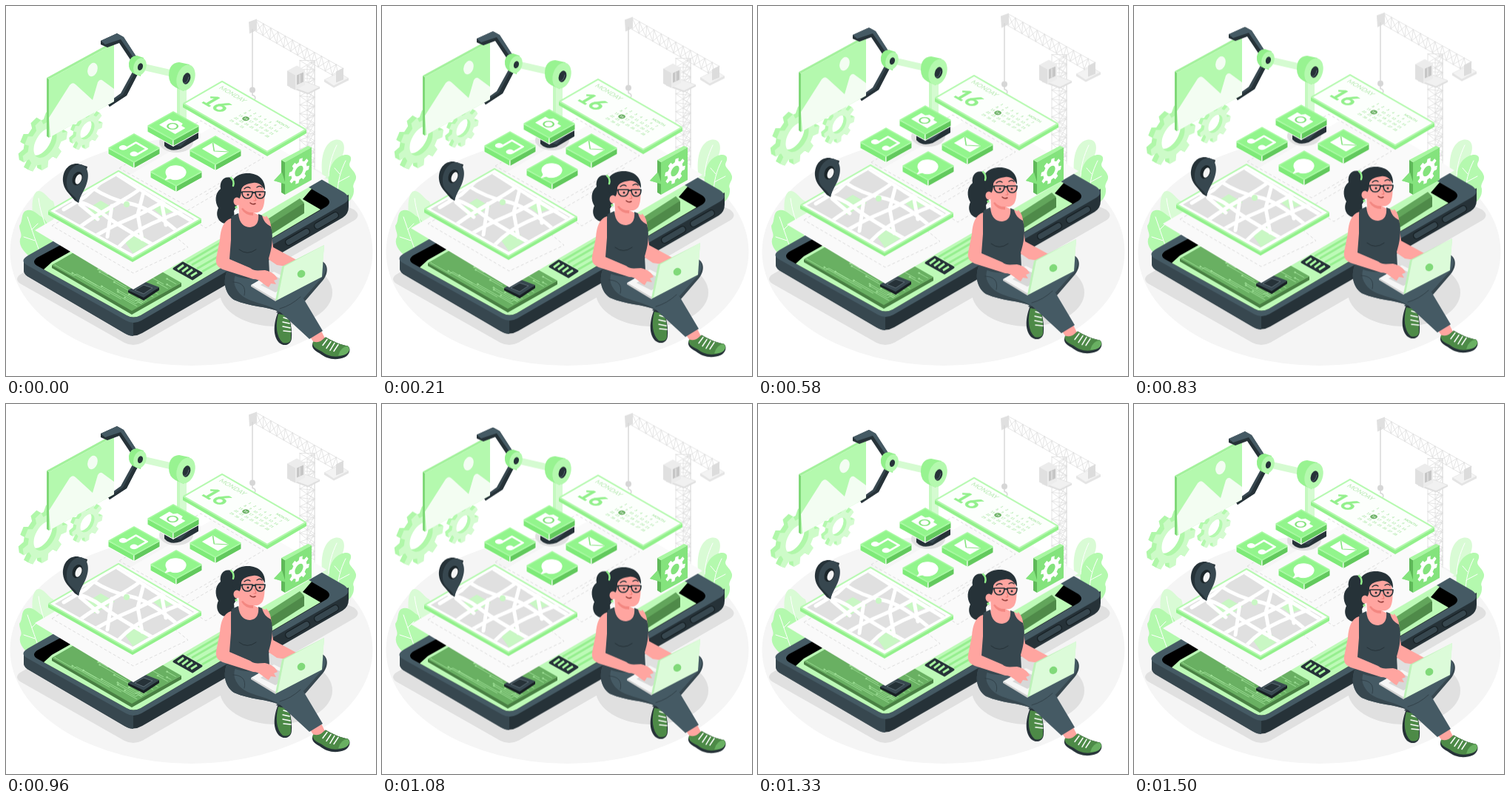
An HTML page for the animation above (1.54 s loop, 500 by 500 pixels).

```html
<!DOCTYPE html>
<html lang="en">
<head>
<meta charset="utf-8">
<title>App development</title>
<style>
html, body { margin: 0; width: 100%; height: 100%; overflow: hidden; background: #fff; }
svg { display: block; width: 100%; height: 100%; }
.float { animation: float 1540ms linear infinite; }
@keyframes float {
  0%, 97%, 100% { transform: translateY(0); }
  48% { transform: translateY(-10px); }
}
.line { fill: none; stroke-linecap: round; stroke-linejoin: round; }
text { font-family: Lato, sans-serif; }
</style>
</head>
<body>
<svg viewBox="0 0 500 500">
<defs>
  <g id="tile" stroke-linejoin="round">
    <path d="M-35 0V8L0 27.500V19Z" fill="#7eea78"/>
    <path d="M35 0V8L0 27.500V19Z" fill="#62c95d"/>
    <path d="M-34 0L0-19L34 0L0 19Z" fill="#92f58c" stroke="#a6faa0" stroke-width="1.500"/>
  </g>
  <clipPath id="mapClip"><path d="M66 277L152 228L254 288L171 335Z"/></clipPath>
  <clipPath id="boardClip"><path d="M65 350L170 410L233 374L128 314Z"/></clipPath>
</defs>

<ellipse cx="250.500" cy="332" rx="245" ry="154" fill="#f5f5f5"/>
<g fill="#e0e0e0">
  <path d="M19 363Q11 369 19 375L160 455Q172 461 184 455L470 290Q481 283 470 275L300 200Z"/>
  <ellipse cx="365" cy="387" rx="76" ry="46"/>
</g>

<g id="bushes">
  <path d="M39 300C34 275 34 258 41 251C50 246 57 262 64 264C70 280 62 300 50 312Z" fill="#d9fbd5"/>
  <path d="M38 344C25 333 17 325 19 315C23 309 18 304 18 297C23 291 20 281 26 277C36 272 42 282 50 286C63 300 66 320 64 335Z" fill="#b4f9ae"/>
  <path d="M428 232C424 208 429 185 444 181C457 178 460 191 454 204C450 215 448 226 446 236Z" fill="#d9fbd5"/>
  <path d="M438 250C432 230 438 209 452 203C463 198 469 203 465 211C461 218 471 221 473 230C474 237 467 240 470 247C471 257 465 264 458 268Z" fill="#b4f9ae"/>
  <path d="M29 285C36 305 40 318 47 336M24 312L39 317M35 302L43 294M44 260C46 275 49 285 55 300M447 188C440 203 437 214 436 230M459 209C452 223 448 237 448 255M451 227L444 219M449 238L464 230" class="line" stroke="#fff" stroke-width="1"/>
</g>

<g class="float">
  <g id="gears"></g>

  <g id="crane" transform="translate(0 1.500)">
    <g id="truss" class="line" stroke="#dedede" stroke-width=".8"></g>
    <path d="M328 20L339 16V31L329 36Z" fill="#e0e0e0"/>
    <path d="M333 30V110" class="line" stroke="#d6d6d6" stroke-width="1.400"/>
    <circle cx="333" cy="112" r="4" fill="#d6d6d6"/>
    <path d="M333 115V119C339 120 337 127 333 126" class="line" stroke="#d6d6d6" stroke-width="1.500"/>
    <path d="M430 98L450 88L463 96V99L443 109L430 101Z" fill="#e4e4e4"/>
    <path d="M431 98L450 89L462 96L443 106Z" fill="#f3f3f3"/>
    <path d="M446 87L456 82V98L446 102Z" fill="#dcdcdc"/>
    <path d="M384 107L400 99L424 108L408 116Z" fill="#f1f1f1" stroke="#dedede" stroke-width=".7"/>
    <path d="M384 107V109L408 118L424 110V108L408 116Z" fill="#dedede"/>
    <path d="M380 86L393 79L404 85V105L391 112L380 106Z" fill="#ececec"/>
    <path d="M380 86L391 92V112L380 106Z" fill="#e0e0e0"/>
    <path d="M393 92L402 88V101L393 105Z" fill="#c6c6c6"/>
    <path d="M397 91V103" stroke="#eee"/>
  </g>

  <g id="phone">
    <path d="M24 343V357Q24 363 32 367L160 442Q172 449 184 442L455 286Q463 281 463 271V255L172 400Z" fill="#263238"/>
    <path d="M24 343V357Q24 363 32 367L160 442Q166 446 172 446V420Z" fill="#37474f"/>
    <path d="M30 337Q18 344 28 350L162 425Q172 431 183 425L457 267Q468 260 457 252L330 179Q318 173 308 179Z" fill="#455a64"/>
    <path d="M42 340Q34 346 42 351L163 418Q172 423 182 418L433 271Q441 265 433 259L318 192Z" fill="#000"/>
    <path d="M51 356L163 418Q172 423 182 418L425 275L401 261L413 247L395 237L318 192L85 333L62 346Z" fill="#bdfab7"/>
    <g class="line">
      <path d="M382 319L406 305M421 297L445 283" stroke="#161f23" stroke-width="10"/>
      <path d="M382 319L406 305M421 297L445 283" stroke="#37474f" stroke-width="7.500"/>
    </g>
    <path d="M62 350V354L170 417L237 379V374L170 411Z" fill="#498043"/>
    <path d="M62 350L170 412L237 374L128 312Z" fill="#69b062"/>
    <g id="board" class="line" stroke="#a6e79f" stroke-width=".8" clip-path="url(#boardClip)"></g>
    <path d="M165 384V387L186 398L207 384V380L186 392Z" fill="#171f23"/>
    <path d="M165 384L186 372L207 380L186 394Z" fill="#37474f"/>
    <path d="M174 384L186 377L198 381L186 389Z" fill="#263238" stroke="#67777f" stroke-width=".8"/>
    <path d="M251 350L294 325M258 355L300 331M265 359L300 339M244 347L290 320" stroke="#96ef8f" stroke-width="3"/>
    <path d="M227 355L239 347L264 361L252 369Z" fill="#263238" stroke="#263238" stroke-width="3" stroke-linejoin="round"/>
    <path d="M232 356L240 350M238 359L246 353M244 362L252 356M250 365L258 360" stroke="#a8f8a1" stroke-width="3"/>
    <path d="M335 300L397 263L403 267V280L350 314Z" fill="#4f8a49"/>
    <path d="M335 300L397 260L403 266L350 300Z" fill="#62a55b"/>
  </g>

  <g id="sheet">
    <path d="M39 303L300 151L433 231L172 383Z" fill="#fafafa"/>
    <path d="M62 297L150 246L246 326L172 361ZM153 219L263 155L348 205L240 268ZM239 280L308 240L340 258L270 300ZM270 255L330 220" fill="none" stroke="#dedede" stroke-width="1" stroke-dasharray="4 3"/>
  </g>

  <g id="base">
    <ellipse cx="230" cy="184" rx="23" ry="14" fill="#e0e0e0"/>
    <path d="M214 183V189Q222 198 236 193L260 179V170Z" fill="#263238"/>
    <path d="M214 184L258 168L236 190Z" fill="#37474f"/>
  </g>

  <g id="arm">
    <path d="M231 106H244V158H231Z" fill="#d5fbd1"/>
    <path d="M231 106H235V158H231Z" fill="#c5f9c0"/>
    <path d="M184 82L232 93" stroke="#d5fbd1" stroke-width="9"/>
    <path d="M171 89L178 92L163 121L140 136L137 131L155 118Z" fill="#37474f"/>
    <path d="M178 92L163 121L140 136L138 133L158 120L174 90Z" fill="#263238"/>
    <path d="M55 97L58 99V178L55 176Z" fill="#7fd878"/>
    <path d="M55 97L143 49L146 51L58 99Z" fill="#a2f19b"/>
    <path d="M58 99L146 51V129L58 178Z" fill="#b4f9ae"/>
    <path d="M58 151L86 107Q90 102 94 106L117 127L124 103Q127 98 131 101L146 112V129L60 177Z" fill="#f3fdf2"/>
    <ellipse cx="117" cy="86" rx="6.500" ry="9.500" fill="#f3fdf2" transform="rotate(18 117 86)"/>
    <path d="M128 47L150 37L159 42L179 73L171 77L153 50L137 56L128 52Z" fill="#263238"/>
    <path d="M128 47L150 37L159 42L179 73L175 74L155 45L134 52Z" fill="#455a64"/>
    <path d="M166 77Q168 67 177 67L186 70L182 95L174 92Q165 88 166 77Z" fill="#92f08b"/>
    <ellipse cx="181" cy="82" rx="8.500" ry="12" fill="#b4f9ae" transform="rotate(18 181 82)"/>
    <ellipse cx="181.500" cy="82" rx="3.400" ry="5" fill="#263238" transform="rotate(18 181 82)"/>
    <path d="M220 94Q220 77 234 76L248 79L240 115L229 110Q220 105 220 94Z" fill="#98f391"/>
    <ellipse cx="243" cy="97" rx="12" ry="18" fill="#b4f9ae" transform="rotate(18 243 97)"/>
    <ellipse cx="244" cy="98" rx="5" ry="8" fill="#263238" transform="rotate(18 244 98)"/>
    <path d="M241 104Q245 105 247 96" class="line" stroke="#56666e" stroke-width="1"/>
  </g>

  <g id="map">
    <path d="M57 277V282L171 346L264 293V288L171 340Z" fill="#92f08b"/>
    <path d="M58 277L152 223L263 288L171 341Z" fill="#fff" stroke="#b4f9ae" stroke-width="2" stroke-linejoin="round"/>
    <g clip-path="url(#mapClip)">
      <path d="M50 277L152 215L270 288L171 345Z" fill="#e0e0e0"/>
      <path d="M107 276L128 263L147 274L120 290ZM196 272L216 262L236 274L210 283ZM160 318L181 307L195 320L172 335Z" fill="#c9f7c4"/>
      <g class="line" stroke="#fff" stroke-width="5">
        <path d="M88 262Q112 266 131 281T205 326M117 246Q142 262 168 267T232 305M150 228L197 258L250 290M98 300Q116 286 150 267T188 240M122 310Q146 296 168 287T222 259M152 326Q172 305 197 294T246 274M78 275L108 257L133 234M100 268L124 288M143 270L137 312M186 251L178 282L184 315M210 264L216 296"/>
      </g>
      <circle cx="163" cy="268" r="4" fill="#c9f7c4"/>
    </g>
  </g>

  <g id="pin">
    <path d="M77 237C76 221 86 212 97 213L110 217L98 266L93 263C85 253 78 248 77 237Z" fill="#263238"/>
    <path d="M82 241C81 225 91 214 101 214C111 216 113 229 109 240C106 250 101 254 98 266C94 255 83 254 82 241Z" fill="#37474f"/>
    <ellipse cx="96.500" cy="233" rx="6.500" ry="9.500" fill="#1b2529" transform="rotate(22 96 233)"/>
    <ellipse cx="98" cy="234" rx="4" ry="7" fill="#f5f5f5" transform="rotate(22 98 234)"/>
  </g>

  <g id="apps" fill="none" stroke="#fff" stroke-linejoin="round">
    <use href="#tile" x="226" y="162"/>
    <g transform="matrix(.866 .5 -.866 .5 226 162)">
      <path d="M-12-6H-6L-4-10H4L6-6H12V9H-12Z" fill="#fff"/>
      <circle cy="1" r="5.500" stroke="#84e37d" stroke-width="2"/>
    </g>
    <use href="#tile" x="173" y="192"/>
    <g transform="matrix(.866 .5 -.866 .5 173 192)">
      <path d="M-6 8V-9H11V7" stroke-width="3"/>
      <g fill="#fff" stroke="none"><circle cx="-9" cy="8" r="4.500"/><circle cx="8" cy="8" r="4.500"/></g>
    </g>
    <use href="#tile" x="283" y="195"/>
    <g transform="matrix(.866 .5 -.866 .5 283 195)">
      <path d="M-12-8H12V8H-12Z" fill="#fff"/>
      <path d="M-12-8L0 2L12-8" stroke="#84e37d" stroke-width="1.300"/>
    </g>
    <use href="#tile" x="230" y="224"/>
    <path d="M216 226C215 218 224 215 232 216C242 217 246 224 241 230C236 235 226 236 222 233L215 235L218 231Z" fill="#fff"/>
  </g>

  <g id="calendar">
    <path d="M239 132V137L353 203L406 172V167L353 196Z" fill="#92f08b"/>
    <path d="M240 132L292 102L405 167L353 197Z" fill="#fcfffc" stroke="#b4f9ae" stroke-width="2" stroke-linejoin="round"/>
    <text transform="matrix(.866 .5 -.866 .5 287 111)" font-size="8.800" fill="#b5e9b0">MONDAY</text>
    <text transform="matrix(.866 .5 -.866 .5 262 129)" font-size="28" font-weight="700" fill="#92f08b" stroke="#92f08b" stroke-width=".6">16</text>
    <text transform="matrix(.866 .5 -.866 .5 364 156)" font-size="5" font-weight="700" fill="#a5e59f">MONTH</text>
    <g id="days" transform="matrix(.866 .5 -.866 .5 328 142)" font-size="4.500" font-weight="700" text-anchor="middle"></g>
  </g>

  <g id="woman" transform="translate(0 1)">
    <path d="M372 346L422 342C436 345 437 359 428 370L385 420L365 413L395 382Z" fill="#37474f"/>
    <path d="M400 345L424 344C434 347 434 357 427 366L402 394L390 385Z" fill="#455a64"/>
    <path d="M367 414C362 428 360 444 369 454C376 460 386 457 386 447C387 436 384 427 383 418L372 411Z" fill="#263238"/>
    <path d="M368 415C364 430 365 446 374 454C383 456 386 452 385 444C386 435 384 427 382 418Z" fill="#4d8a47"/>
    <path d="M375 420L382 422M374 426L383 428M374 432L384 434M375 438L385 439" class="line" stroke="#fff" stroke-width="1.500"/>
    <path d="M410 445L424 434L431 448L419 458Z" fill="#ffa5a0"/>
    <g transform="translate(0 1.500)">
      <path d="M415 452C424 455 428 448 432 445C444 452 452 455 462 457C467 461 464 469 458 472C446 477 434 475 424 467C415 462 412 458 415 452Z" fill="#263238"/>
      <path d="M415 451C424 454 428 448 432 445C444 452 452 455 462 457C466 461 464 465 459 468C446 474 435 471 426 464C417 460 413 456 415 451Z" fill="#4d8a47"/>
      <path d="M462 457Q452 458 449 470Q463 470 464 461Z" fill="#69b062"/>
      <path d="M428 456L434 448M433 460L439 451M438 463L444 453M443 464L449 455" class="line" stroke="#fff" stroke-width="1.500"/>
    </g>
    <path d="M299 356C293 370 295 387 308 396C330 406 352 404 371 413L410 449L428 438L400 391C390 380 366 374 354 356Z" fill="#455a64"/>
    <path d="M299 356C293 370 295 387 308 396C330 406 352 404 371 413C352 399 324 401 313 384C306 374 308 366 312 358Z" fill="#37474f"/>
    <path d="M307 372Q326 373 322 390M370 408Q385 404 398 392" class="line" stroke="#2e3c43" stroke-width=".8"/>

    <path d="M306 232C295 227 288 236 290 246C282 252 282 264 287 272C282 282 288 294 299 293C309 291 309 282 308 276C314 268 314 258 312 250Z" fill="#263238"/>
    <path d="M300 291C306 283 315 285 315 278L314 262H334V277C340 284 352 279 357 292V306H300Z" fill="#ffa5a0"/>
    <path d="M351 282C358 287 359 298 359 310L361 325L396 344L392 353L366 349L347 336Z" fill="#ffa5a0"/>
    <path d="M305 283L314 279C315 293 322 298 330 298C339 297 342 290 341 280L346 282C348 290 352 294 358 297C362 312 359 327 355 340L356 360C340 371 313 369 299 358L302 330V300Z" fill="#37474f"/>
    <path d="M315 328Q326 337 338 328" class="line" stroke="#263238" stroke-width="1"/>

    <path d="M313 244C316 234 344 233 348 245C351 257 349 270 346 274C341 280 332 279 328 276L320 272C314 270 312 255 313 244Z" fill="#ffa5a0"/>
    <path d="M320 272Q326 279 334 278V282Q323 282 318 273Z" fill="#f38781"/>
    <path d="M305 246C302 232 314 225 327 225C341 225 351 234 350 248C346 241 341 237 334 238C326 239 320 241 318 247C318 253 317 259 314 260C309 259 306 253 305 246Z" fill="#263238"/>
    <ellipse cx="312" cy="263" rx="4.500" ry="5.500" fill="#ffa5a0"/>
    <path d="M304 231Q309 235 307 242" class="line" stroke="#92f08b" stroke-width="2.500"/>
    <g class="line" stroke="#263238" stroke-width="1.700">
      <path d="M319 250H333Q333 259 326 259T319 250ZM337 250H350Q350 259 343.500 259T337 250ZM333 252Q335 250 337 252M319 251L312 250"/>
      <path d="M322 246Q326 242 330 245M339 244Q343 241 346 244" stroke-width="1.300"/>
      <path d="M336 256L338 262H335" stroke="#ed7770" stroke-width="1"/>
      <path d="M330 265Q333 268 337 266" stroke="#8d3935" stroke-width="1.500"/>
    </g>
    <g fill="#263238"><circle cx="327" cy="254" r="1.500"/><circle cx="343" cy="254" r="1.500"/></g>
    <circle cx="311" cy="271" r="1.800" fill="#92f08b"/>

    <path d="M331 376V378L364 398L396 377V375L364 394Z" fill="#d2d2d2"/>
    <path d="M331 376L362 358L396 375L364 395Z" fill="#f6f6f6"/>
    <path d="M344 376L364 364L384 374L364 386Z" fill="#d7d7d7"/>
    <path d="M304 286C294 289 290 300 289 315L284 340C283 348 286 352 293 355L334 368C344 368 348 376 355 379L358 374L365 375L362 370L367 368C364 361 358 358 350 356C342 356 336 358 330 353L302 341L304 315Z" fill="#ffa5a0"/>
    <path d="M364 397L373 351L430 322L426 365L367 396Z" fill="#bdf2b8"/>
    <path d="M367 396L376 351L430 322L427 365Z" fill="#dcfbd9"/>
    <ellipse cx="399" cy="361" rx="5.500" ry="5" fill="#80d979" transform="rotate(-35 399 361)"/>
  </g>
</g>

<g id="bubble">
  <path d="M362 236L372 225V252L377 240Z" fill="#7fdf78"/>
  <path d="M372 208L377 211V255L372 252Z" fill="#5fb959"/>
  <path d="M362 236L373 225L378 241Z" fill="#84e37d"/>
  <path d="M372 208L408 189L413 191L377 211Z" fill="#a8f7a1"/>
  <path d="M377 211L413 191V235L377 255Z" fill="#84e37d"/>
</g>
</svg>
<script>
const add = (id, markup) => document.getElementById(id).insertAdjacentHTML('beforeend', markup);

// Gear outline with a round hole, centred on the origin
function gearPath(teeth, outer, root, hole) {
  const step = 2 * Math.PI / teeth;
  let d = '';
  for (let i = 0; i < teeth; i++) {
    [[-.3, root], [-.2, outer], [.2, outer], [.3, root]].forEach(([k, r]) => {
      const a = (i + k) * step + .2;
      d += (d ? 'L' : 'M') + (r * Math.cos(a)).toFixed(1) + ' ' + (r * Math.sin(a)).toFixed(1);
    });
  }
  return `${d}ZM${hole} 0A${hole} ${hole} 0 1 0 ${-hole} 0A${hole} ${hole} 0 1 0 ${hole} 0Z`;
}

// Extruded gear on an upright isometric plane
function gear(id, x, y, d, depth, face, side) {
  let out = '';
  for (let i = depth; i >= 0; i--) {
    out += `<path transform="matrix(.866 -.5 0 1 ${x - i} ${y - i * .55})" d="${d}" fill-rule="evenodd" fill="${i ? side : face}"/>`;
  }
  add(id, out);
}
gear('gears', 110, 168, gearPath(9, 24, 18, 11), 4, '#d5fbd1', '#b4f9ae');
gear('gears', 53, 185, gearPath(9, 35, 27, 18), 6, '#cdfbc8', '#b0f7a9');
gear('bubble', 396, 223, gearPath(8, 16, 12, 6.5), 0, '#fff');

// Lattice between two chords
function truss(ax, ay, bx, by, cx, cy, dx, dy, n) {
  const at = (p, q, t) => (p + (q - p) * t).toFixed(1);
  let d = `M${ax} ${ay}L${bx} ${by}M${cx} ${cy}L${dx} ${dy}`;
  for (let i = 0; i < n; i++) {
    const s = i / n, e = (i + 1) / n;
    const top = t => at(ax, bx, t) + ' ' + at(ay, by, t);
    const low = t => at(cx, dx, t) + ' ' + at(cy, dy, t);
    d += `M${top(s)}L${low(e)}M${low(s)}L${top(e)}M${top(s)}L${low(s)}`;
  }
  add('truss', `<path d="${d}"/>`);
}
truss(338, 17, 456, 83, 338, 33, 450, 97, 12);
truss(397, 72, 397, 216, 417, 72, 417, 222, 12);
truss(407, 80, 407, 222, 417, 74, 417, 216, 12);

// Circuit traces
let seed = 7;
const rnd = () => (seed = seed * 16807 % 2147483647) / 2147483647;
let traces = '';
for (let i = 0; i < 30; i++) {
  const u = rnd(), v = (i + .5) / 30, len = 10 + rnd() * 18, turn = rnd() < .5 ? -4 : 4;
  const x = 64 + 106 * u + 66 * v, y = 350 + 61 * u - 38 * v;
  traces += `<path d="M${x} ${y}l${len} ${len * .57}l4 ${turn * .57}l${len} ${len * .57}"/>` +
    `<circle cx="${x}" cy="${y}" r=".9"/>`;
}
add('board', traces);

// Month grid
let days = '';
for (let n = 1; n < 32; n++) {
  const x = (n - 1) % 7 * 8, y = Math.floor((n - 1) / 7) * 7, today = n === 16;
  if (today) days += `<circle cx="${x}" cy="${y - 1.5}" r="4" fill="#69b062"/>`;
  days += `<text x="${x}" y="${y}" fill="${today ? '#fff' : '#a5e59f'}">${n}</text>`;
}
add('days', days);
</script>
</body>
</html>
```
